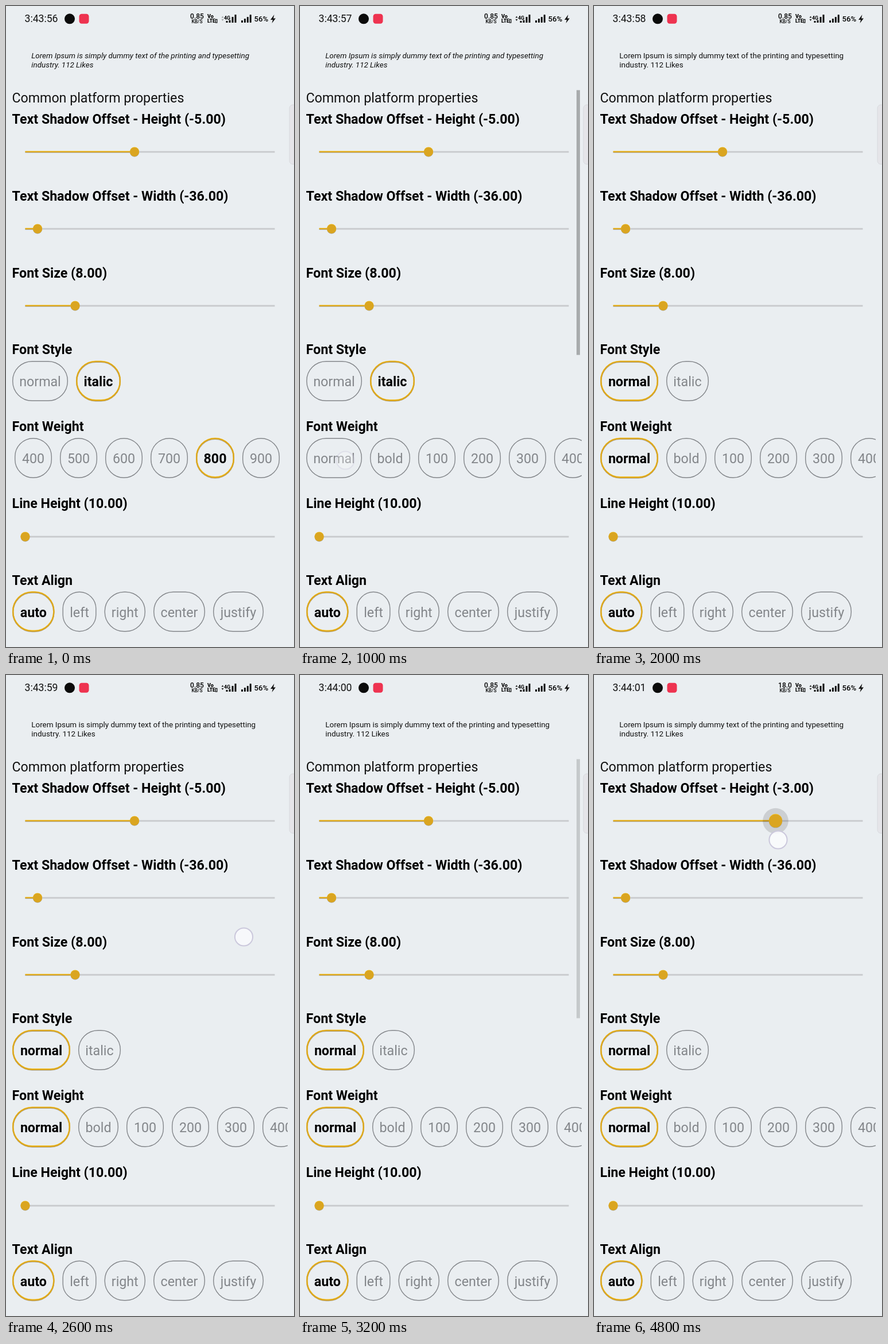
Recreate the animation shown at these times as an HTML page. Size 502 by 1116 pixels, loop 5 s.

```html
<!DOCTYPE html>
<html lang="en">
<head>
<meta charset="utf-8">
<title>Text style playground</title>
<style>
html, body { margin: 0; width: 100%; height: 100%; overflow: hidden; background: #eaeef1; }
svg { display: block; width: 502px; height: 1116px; font-family: Roboto, sans-serif; }
.head { font-size: 23.2px; font-weight: 700; }
.chip { font-size: 23.2px; text-anchor: middle; fill: #83868a; }
.on { font-weight: 700; fill: #000; }
.para { font-size: 13.43px; fill: #101010; }
</style>
</head>
<body>
<svg id="stage" viewBox="0 0 502 1116">
  <defs><clipPath id="list"><rect x="11" y="146" width="480" height="970"/></clipPath></defs>
  <g id="view"></g>
</svg>
<script>
const LOOP = 5000, STEP = 200;
const GOLD = '#daa520', YELLOW = '#ffcf2e', GREY = '#a5a6a5';
const view = document.getElementById('view');

const text = (x, y, s, attrs = '') => `<text x="${x}" y="${y}" ${attrs}>${s}</text>`;
const rect = (x, y, w, h, fill, attrs = '') =>
  `<rect x="${x}" y="${y}" width="${w}" height="${h}" fill="${fill}" ${attrs}/>`;
const circle = (x, y, r, fill, attrs = '') =>
  `<circle cx="${x}" cy="${y}" r="${r}" fill="${fill}" ${attrs}/>`;
const mix = (a, b, p) => a + (b - a) * p;
const clamp = v => Math.max(0, Math.min(1, v));
const head = (y, s) => text(10.6, y, s, 'class="head"');

// Chip widths: plain, then selected
const WIDTHS = {
  normal: [97, 101], bold: [70, 73], italic: [74, 78], auto: [70, 73.5],
  left: [59, 62], right: [71.5, 75], center: [90, 94], justify: [88, 92]
};
const WEIGHTS = ['normal', 'bold', 100, 200, 300, 400, 500, 600, 700, 800, 900];

function chip(x, y, w, label, on) {
  const edge = (dy, color, line) => {
    const m = line / 2;
    return rect(x + m, y + m + dy, w - line, 70 - line, 'none',
      `rx="${Math.min(w / 2, 34.5) - m}" stroke="${color}" stroke-width="${line}"`);
  };
  const border = on
    ? edge(0.7, GREY, 2.4) + edge(-0.5, YELLOW, 2.4) + edge(0, GOLD, 2.2)
    : edge(0, '#83868a', 1.4);
  return border + text(x + w / 2, y + 44, label, `class="chip${on ? ' on' : ''}"`);
}

function chips(y, labels, picked, shift = 0) {
  let x = 11 - shift, out = '';
  for (const label of labels) {
    const on = label === picked;
    const w = (WIDTHS[label] || [65, 67])[+on];
    if (x < 491 && x + w > 11) out += chip(x, y, w, label, on);
    x += w + 14;
  }
  return out;
}

function slider(x, y, active = false, halo = 0) {
  const r = active ? 11.6 : 8;
  return rect(33.5, y - 1.4, 435, 2.8, '#c8cacd') +
    rect(33.5, y - 1.6, x - 33.5, 1.6, YELLOW) +
    rect(33.5, y, x - 33.5, 1.6, GREY) +
    rect(33.5, y - 1, x - 33.5, 2, GOLD) +
    (halo ? circle(x, y, 22.3, '#000', `fill-opacity="${halo}"`) : '') +
    circle(x, y + 0.7, r, GREY) + circle(x, y - 0.6, r, YELLOW) + circle(x, y, r, GOLD);
}

function bars(x, bottom) {
  return [4, 7, 10, 14].map((h, i) => rect(x + i * 4.9, bottom - h, 3, h, '#111', 'rx="0.8"')).join('');
}

function status(t) {
  const ticks = [200, 1200, 2200, 3000, 4200].filter(at => t >= at).length;
  const sec = 43 * 60 + 56 + ticks;
  const clock = `3:${Math.floor(sec / 60)}:${String(sec % 60).padStart(2, '0')}`;
  const arrows = t < 600 ? '#a0a3a5' : '#222';
  return text(32.5, 28.3, clock, 'font-size="17.6" fill="#111"') +
    circle(111, 22.3, 9, '#0b0b0b') +
    rect(127.5, 13.7, 17, 17, '#ee3350', 'rx="4.5"') +
    text(333, 22.4, t < 3600 ? '0.85' : '18.0', 'font-size="12" font-weight="500" text-anchor="middle"') +
    text(333, 30, 'KB/S', 'font-size="8.4" font-weight="500" text-anchor="middle"') +
    text(351, 21, 'Vo', 'font-size="9" font-weight="800"') +
    text(351, 29.3, 'LTE', 'font-size="8.4" font-weight="800"') +
    rect(365.3, 23.4, 2.6, 5.6, 'none', 'stroke="#111" stroke-width="1.2"') +
    `<path d="M375.5 20.5l2-3 2 3zM375.5 23l2 3 2-3z" fill="${arrows}"/>` +
    text(380, 24, '4G', 'font-size="8.8" font-weight="700"') +
    rect(383.5, 26, 3, 3, '#111') + rect(388.5, 24.6, 3, 4.4, '#111') +
    rect(393.5, 19, 3, 10, '#111') + rect(398.5, 15, 3, 14, '#111') +
    bars(410, 29) +
    text(432.5, 27.2, '56%', 'font-size="13.2" font-weight="500"') +
    '<path d="M467.5 15l-6.5 9h4l-1.5 6 6.500-8.500h-4z" fill="#111"/>';
}

function scrollbar(t) {
  let alpha = 0, h = 461;
  if (t >= 200 && t < 2000) alpha = 1 - clamp((t - 1600) / 400);
  if (t >= 2800 && t < 3400) { alpha = t < 3200 ? 1 : 0.55; h = 451; }
  return alpha ? rect(482, 146.5, 6, h, '#a8abad', `opacity="${alpha}"`) : '';
}

// Finger strokes: start, end, path, opacity at each end
const STROKES = [
  { from: 800, to: 1000, a: [79, 791], b: [79, 791], fade: [1, 0.35] },
  { from: 1400, to: 1400, a: [58, 669], b: [58, 669], fade: [0.4, 0.4] },
  { from: 2600, to: 2800, a: [414.5, 456], b: [414.5, 660], fade: [1, 1] },
  { from: 4600, to: 4800, a: [284, 275], b: [321, 287], fade: [1, 1] }
];

function finger(t) {
  const s = STROKES.find(k => t >= k.from && t <= k.to);
  if (!s) return '';
  const p = s.to > s.from ? (t - s.from) / (s.to - s.from) : 0;
  return circle(mix(s.a[0], s.b[0], p), mix(s.a[1], s.b[1], p), 15.6, '#fafbfd',
    `fill-opacity="0.86" stroke="#cbc8dc" stroke-width="2" opacity="${mix(...s.fade, p)}"`);
}

function draw(t) {
  const italic = t < 1400;
  const weight = t < 1200 ? 800 : 'normal';
  const shift = 428 * Math.pow(1 - clamp(t / 400), 1.8);
  const drag = clamp((t - 4400) / 400);
  const para = `class="para"${italic ? ' font-style="italic"' : ''}`;
  const value = t < 4800 ? '-5.00' : '-3.00';
  view.innerHTML = rect(0, 0, 502, 1116, '#eaeef1') + status(t) +
    text(44.3, 91, 'Lorem Ipsum is simply dummy text of the printing and typesetting', para) +
    text(44.3, 107, 'industry. 112 Likes', para) +
    text(10.4, 168.2, 'Common platform properties', 'font-size="23.2" fill="#111"') +
    head(205, `Text Shadow Offset - Height (${value})`) +
    slider(mix(224, 316.5, drag), 254, drag > 0, t >= 4800 ? 0.13 : 0) +
    head(339, 'Text Shadow Offset - Width (-36.00)') + slider(55, 388) +
    head(472.6, 'Font Size (8.00)') + slider(120.5, 522) +
    head(606.4, 'Font Style') + chips(618, ['normal', 'italic'], italic ? 'italic' : 'normal') +
    head(740.4, 'Font Weight') +
    `<g clip-path="url(#list)">${chips(752, WEIGHTS, weight, shift)}</g>` +
    head(874.4, 'Line Height (10.00)') + slider(33.5, 924) +
    head(1008.4, 'Text Align') +
    chips(1019.5, ['auto', 'left', 'right', 'center', 'justify'], 'auto') +
    scrollbar(t) +
    rect(494, 172, 16, 103.5, '#e5e5e9', 'rx="6" stroke="#d8dade" stroke-width="1"') +
    finger(t);
}

let last = -1;
function tick(now) {
  const t = Math.floor((now % LOOP) / STEP) * STEP;
  if (t !== last) draw(last = t);
  requestAnimationFrame(tick);
}
draw(0);
requestAnimationFrame(tick);
</script>
</body>
</html>
```
